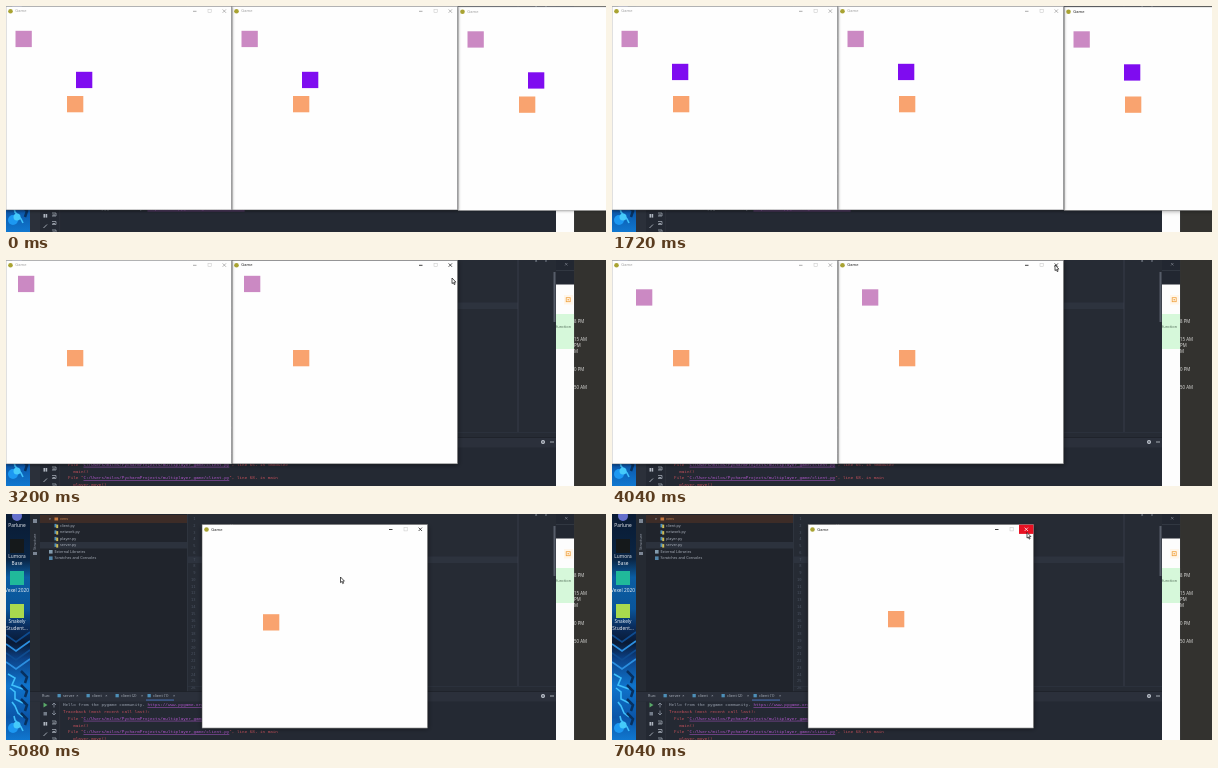
An HTML page with a canvas for the animation above (7160 ms loop, 600x226 px).

```html
<!DOCTYPE html>
<html lang="en">
<head>
<meta charset="utf-8">
<title>Game windows</title>
<style>
html, body { margin: 0; width: 100%; height: 100%; overflow: hidden; background: #242933; }
canvas { display: block; }
</style>
</head>
<body>
<canvas id="stage" width="600" height="226"></canvas>
<script>
const ctx = document.getElementById('stage').getContext('2d');
const LOOP = 7160, W = 225.5, H = 203.6;
const MONO = '"DejaVu Sans Mono", monospace', SANS = '"Open Sans", "Noto Sans", sans-serif';
const GREY = '#9ba3b0', RED = '#c4505a', LINK = '#ad55c8', GREEN = '#8bb573';
const TYPE = 4.25, CHAR = TYPE * .602, ROW = 6.77;

function rect(x, y, w, h, color) {
  ctx.fillStyle = color;
  ctx.fillRect(x, y, w, h);
}

function line(color, width, ...pts) {
  ctx.strokeStyle = color;
  ctx.lineWidth = width;
  ctx.beginPath();
  for (let i = 0; i < pts.length; i += 2) ctx.lineTo(pts[i], pts[i + 1]);
  ctx.stroke();
}

function dot(x, y, r, color) {
  ctx.fillStyle = color;
  ctx.beginPath();
  ctx.arc(x, y, r, 0, 7);
  ctx.fill();
}

// Small type is laid out ten times larger so glyph advances are not rounded.
function text(str, x, y, color, size = TYPE, font = MONO, align = 'left') {
  ctx.save();
  ctx.translate(x, y);
  ctx.scale(.1, .1);
  ctx.font = `${size * 10}px ${font}`;
  ctx.textAlign = align;
  ctx.textBaseline = 'middle';
  ctx.fillStyle = color;
  ctx.fillText(str, 0, 0);
  ctx.restore();
}

// Position along a list of [time, x, y] points.
function along(points, t) {
  let a = points[0];
  for (const b of points) {
    if (t < b[0]) {
      const p = Math.max(0, (t - a[0]) / (b[0] - a[0] || 1));
      return [a[1] + (b[1] - a[1]) * p, a[2] + (b[2] - a[2]) * p];
    }
    a = b;
  }
  return [a[1], a[2]];
}

const CLOSE3 = 2100, CLOSE2 = 4060, FADE = 240;
const purplePath = [[0, 70, 65.5], [300, 70, 65.5], [1000, 60, 65.5], [1600, 60, 57.5]];
const pinkPath = [[2500, 9.5, 24.5], [2700, 12, 24.5], [3000, 12, 15.5], [3300, 12, 15.5], [3650, 24, 15.5], [3900, 24, 29]];
const orangePath = [[5200, 61, 89.7], [5600, 72.5, 89.7], [5840, 72.5, 94.5], [6150, 72.5, 94.5], [6650, 80, 94.5], [7040, 80, 86.5]];
const dragPath = [[4520, 0, .3], [4950, 196, 10.5]];
const cursorPath = [[2440, 606, 40], [2600, 400, 40], [2960, 400, 40], [3200, 446, 18], [3900, 446, 18], [4020, 443, 5],
  [4100, 443, 5], [4280, 406, 12], [4480, 110, 5], [4520, 110, 5], [4950, 306, 15.5], [5080, 334.5, 63],
  [5500, 334.5, 63], [5840, 415, 18.5]];

function wallpaper() {
  const g = ctx.createLinearGradient(0, 0, 0, 226);
  [[0, '#0a1b33'], [.2, '#0a2544'], [.28, '#0b5da2'], [.42, '#0a559a'], [.5, '#0a2c5c'], [.57, '#0a1a34'],
    [.64, '#0c4288'], [.76, '#0f74cc'], [.9, '#0b55a8'], [1, '#1078d0']].forEach(s => g.addColorStop(...s));
  rect(0, 0, 24, 226, g);
  for (let i = 0; i < 4; i++) {
    const y = 121 + i * 9;
    line(i % 2 ? '#2c8fe0' : '#0f4c90', 1.8, 0, y, 10, y + 7, 24, y - 3);
  }
  for (let i = 0; i < 4; i++) {
    const y = 160 + i * 14;
    line('#3fc0fb', 1.6, 2 + i * 2, y, 9, y + 4, 6 + i * 3, y + 11, 17, y + 15);
    line('#07305f', 2.5, 15, y - 3, 21, y + 3, 19, y + 9);
  }
  dot(7, 214, 5, '#1c98f2');
  dot(11, 211, 3.5, '#45cafa');

  const label = (s, y) => text(s, 11, y, '#f2f5f9', 4.8, SANS, 'center');
  dot(11, 2, 5, '#6570cc');
  label('Parlune', 11.5);
  rect(4, 25, 14, 14, '#15191b');
  label('Lumora', 43);
  label('Base', 49.5);
  rect(4, 57, 14, 14, '#20b99a');
  label('Vexel 2020', 76.5);
  rect(4, 90, 14, 14, '#a9d94e');
  label('Snakely', 108);
  label('Student...', 114.5);
}

const code = [
  [1, 0, 'games = {}'],
  [4, 0, 'class Server:'],
  [6, 1, 'def __init__(self):'],
  [7, 2, 'self.server_ip = "192.168.1.157"'],
  [8, 2, 'self.port = 5555'],
  [9, 2, 'self.server_settings = (self.server_ip, self.port)'],
  [10, 2, 'self.server_socket = socket.socket(socket.AF_INET, socket.SOCK_STREAM)'],
  [11, 2, 'self.player_index = 0'],
  [13, 1, 'def start(self):'],
  [14, 2, 'try:'],
  [15, 3, 'self.server_socket.bind(self.server_settings)'],
  [16, 2, 'except Exception as e:'],
  [17, 3, 'print("[ERROR] Error trying to bind server.", e)'],
  [19, 2, 'self.server_socket.listen(10)'],
  [20, 2, 'self.listen_connections()'],
  [21, 2, 'print(f"[CONNECTION] Listening for connections on {self.port}")'],
  [23, 1, 'def listen_connections(self):'],
  [24, 2, 'while True:'],
  [25, 3, 'self.server_socket.accept()']
];

function codeLine(row, indent, str) {
  const y = 5 + row * ROW;
  let x = 202.5 + indent * 4 * CHAR;
  for (const part of str.split(/("[^"]*"|\bself\b|\b(?:def|class|while|try|except|as)\b)/)) {
    const color = part[0] === '"' ? GREEN : part === 'self' ? '#bd7580'
      : /^(def|class|while|try|except|as)$/.test(part) ? '#a678b8' : GREY;
    text(part, x, y, color);
    x += part.length * CHAR;
  }
}

function tree() {
  const label = (s, x, y, color = '#b1b8c3') => text(s, x, y, color, 3.8, SANS);
  rect(24, 0, 10, 178, '#252a32');
  rect(34, 0, 147, 178, '#20242c');
  rect(34, 1, 147, 8, '#3d2c27');
  rect(34, 28, 147, 6.5, '#2c323d');
  text('▸', 43, 5, GREY);
  rect(48.5, 3.5, 3.6, 3, '#c5773d');
  label('venv', 54, 5.2, '#c9854f');
  ['client.py', 'network.py', 'player.py', 'server.py'].forEach((name, i) => {
    const y = 11.9 + i * 6.5;
    rect(48.5, y - 2, 2, 3.5, '#4e91bd');
    rect(50.2, y - 1.3, 2, 3.5, '#cdbb57');
    label(name, 54, y);
  });
  ['External Libraries', 'Scratches and Consoles'].forEach((name, i) => {
    const y = 37.8 + i * 6.4;
    rect(43, y - 1.8, 3.6, 3.6, i ? '#5385a8' : '#839bad');
    label(name, 48.5, y);
  });
  ctx.save();
  ctx.translate(29, 36);
  ctx.rotate(-Math.PI / 2);
  label('Structure', 0, 0, GREY);
  ctx.restore();
  rect(27, 5, 4, 4, '#7c8694');
  rect(27, 38, 4, 3, '#7c8694');
}

function consolePanel(crashed) {
  const label = (s, x) => text(s, x, 181.8, '#b1b8c3', 3.9, SANS);
  rect(24, 177.5, 526, 10, '#2b303b');
  rect(24, 177, 526, .6, '#191d24');
  label('Run:', 36);
  [['server', 57], ['client', 86], ['client (2)', 115], ['client (1)', 147]].forEach(([name, x]) => {
    rect(x - 5.5, 180, 3.3, 3.3, '#4d8fb8');
    label(name, x);
    label('×', x + name.length * 1.7 + 3);
  });
  rect(140, 185.6, 28, .9, '#4b78c8');
  dot(537, 182, 2, '#c4cad2');
  dot(537, 182, .8, '#2b303b');
  rect(544, 181.6, 4, .8, '#c4cad2');

  rect(24, 187.5, 10, 39, '#2b303a');
  rect(53.5, 187.5, .6, 39, '#303641');
  ctx.fillStyle = '#59a869';
  ctx.beginPath();
  ctx.moveTo(37.5, 188.5); ctx.lineTo(41.5, 191); ctx.lineTo(37.5, 193.5);
  ctx.fill();
  line('#8d96a3', .8, 46, 191, 48, 189, 50, 191);
  line('#8d96a3', .8, 48, 189, 48, 193.5);
  line('#8d96a3', .8, 46, 199, 48, 201, 50, 199);
  line('#8d96a3', .8, 48, 196.5, 48, 201);
  rect(37.5, 198, 3.5, 3.5, '#727b88');
  for (let i = 0; i < 3; i++) {
    line('#aeb5bf', .7, 46, 207 + i * 8.5, 50, 207 + i * 8.5, 50, 210 + i * 8.5, 46, 210 + i * 8.5);
    rect(46.5, 208.6 + i * 8.5, 2.5, .8, '#aeb5bf');
  }
  rect(37.5, 208, 1.6, 3.6, '#aeb5bf');
  rect(39.6, 208, 1.6, 3.6, '#aeb5bf');
  line('#aeb5bf', .9, 37.5, 222, 41, 218.5);

  const col = n => 57 + n * CHAR;
  const link = (str, n, y) => {
    text(str, col(n), y, LINK);
    rect(col(n), y + 2, str.length * CHAR, .5, LINK);
  };
  const y0 = crashed ? 191 : 202.7;
  text('Hello from the pygame community.', 57, y0, GREY);
  link('https://www.pygame.org/contribute.html', 33, y0);
  if (!crashed) return;
  const file = (y, tail) => {
    text('File "', col(2), y, RED);
    link('C:/Users/milos/PycharmProjects/multiplayer_game/client.py', 8, y);
    text('", line ' + tail, col(65), y, RED);
  };
  text('Traceback (most recent call last):', 57, 198, RED);
  file(204.8, '65, in <module>');
  text('main()', col(4), 211.6, RED);
  file(218.2, '68, in main');
  text('player.move()', col(4), 225, RED);
}

function rightSide() {
  rect(550, 0, 18.2, 226, '#fdfdfd');
  rect(550, 0, 18.5, 24.5, '#222731');
  rect(550, 10, 18.5, .6, '#3b414c');
  line('#9299a4', .5, 559, 3, 561.5, 5.5);
  line('#9299a4', .5, 561.5, 3, 559, 5.5);
  rect(558, 35, 9, 9.5, '#fff6ea');
  ctx.strokeStyle = '#f0a03c';
  ctx.lineWidth = .8;
  ctx.strokeRect(560.2, 37.7, 4, 4);
  dot(562.2, 39.7, .8, '#f0a03c');
  rect(550, 54, 18.2, 35, '#d6f8da');
  text('function', 550, 66.5, '#4b6650', 3.9, 'italic, ' + SANS);
  rect(568.2, 0, 31.8, 226, '#33322f');
  [['8 PM', 62], ['15 AM', 80], ['PM', 86], ['M', 92], ['0 PM', 110], ['50 AM', 128]]
    .forEach(([s, y]) => text(s, 568, y, '#e4e4e2', 4.4, SANS));
}

function desktop(crashed) {
  wallpaper();
  rect(24, 0, 526, 226, '#242933');
  tree();
  rect(181, 0, 369, 178, '#262b34');
  rect(181, 0, .6, 178, '#353b47');
  rect(181, 42.5, 331, 6.5, '#2d333e');
  for (let i = 0; i < 26; i++) text(String(i + 1), 189.5, 5 + i * ROW, '#4a5260', 3.8, MONO, 'right');
  code.forEach(l => codeLine(...l));
  rect(511.6, 0, .8, 172, '#3c424e');
  rect(181, 172, 369, .6, '#303641');
  text('8 ^ v', 529, 1, GREY, 4);
  rect(547.5, 12, 2, 50, '#565d69');
  consolePanel(crashed);
  rightSide();
}

function gameWindow(x, y, active, players, closing = 0, hot = false) {
  if (closing >= 1) return;
  ctx.save();
  const s = 1 - .03 * closing;
  ctx.translate(x + W / 2, y + H / 2);
  ctx.scale(s, s);
  ctx.translate(-W / 2, -H / 2);
  ctx.globalAlpha = 1 - closing;
  if (!closing) {
    ctx.shadowColor = 'rgba(0,0,0,.5)';
    ctx.shadowBlur = active ? 5 : 3;
    ctx.shadowOffsetY = 1;
  }
  rect(0, 0, W, H, '#fefefe');
  ctx.shadowColor = 'transparent';
  ctx.strokeStyle = active ? '#707070' : '#aaa';
  ctx.lineWidth = .5;
  ctx.strokeRect(.1, .1, W - .2, H - .2);

  const ink = active ? '#111' : '#999';
  dot(4.5, 5, 2.3, '#a9a332');
  text('Game', 9.3, 5, ink, 4, SANS);
  if (hot) rect(211, .2, 14.4, 9.2, '#e81123');
  line(ink, .8, 187, 5, 190.5, 5);
  ctx.strokeStyle = '#c4c4c4';
  ctx.lineWidth = .5;
  ctx.strokeRect(202, 3.2, 3.2, 3.2);
  const cross = hot ? '#fff' : ink;
  line(cross, .7, 216.6, 3.1, 220, 6.5);
  line(cross, .7, 220, 3.1, 216.6, 6.5);
  for (const [[px, py], color] of players) rect(px, py, 16.3, 16.3, color);
  ctx.restore();
}

function cursor(x, y) {
  ctx.save();
  ctx.translate(x, y);
  ctx.beginPath();
  [[0, 0], [0, 5.6], [1.3, 4.5], [2.2, 6.6], [3.1, 6.2], [2.2, 4.2], [3.9, 4.1]].forEach(p => ctx.lineTo(...p));
  ctx.closePath();
  ctx.fillStyle = '#fff';
  ctx.fill();
  ctx.strokeStyle = '#111';
  ctx.lineWidth = .7;
  ctx.stroke();
  ctx.restore();
}

function draw(t) {
  const fade = start => Math.min(1, Math.max(0, (t - start) / FADE));
  const orange = [along(orangePath, t), '#f9a36f'];
  const pink = [along(pinkPath, t), '#cb89c3'];
  const purple = [along(purplePath, t), '#7f0cf0'];
  const inThree = [pink, orange, purple];
  const inTwo = t < CLOSE3 ? inThree : [pink, orange];
  const inOne = t < CLOSE2 ? inTwo : [orange];

  ctx.clearRect(0, 0, 600, 226);
  desktop(t >= CLOSE3 + FADE);
  gameWindow(452, .8, t >= 400, inThree, fade(CLOSE3));
  gameWindow(226, .3, t >= 2600, inTwo, fade(CLOSE2));
  gameWindow(...along(dragPath, t), t >= 4500, inOne, 0, t >= 5800);
  if (t >= 2440) cursor(...along(cursorPath, t));
}

const begin = performance.now();
function tick() {
  draw((performance.now() - begin) % LOOP);
  requestAnimationFrame(tick);
}
tick();
</script>
</body>
</html>
```
